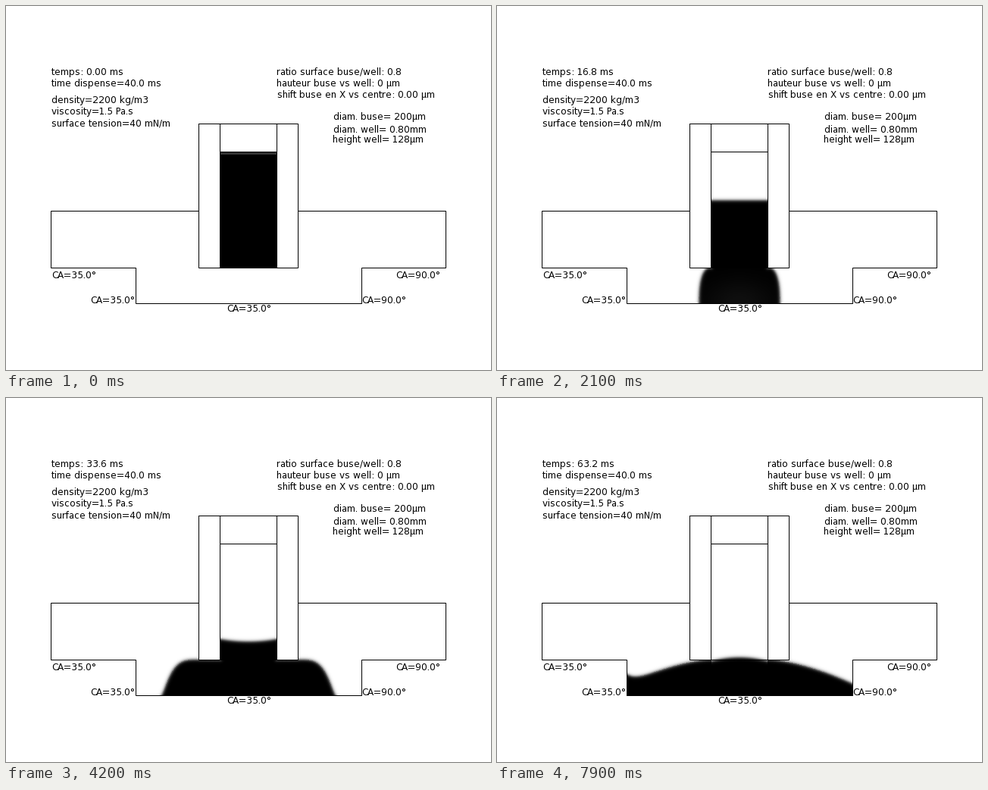
A matplotlib script that plays this animation: 640x480 px, repeating every 8000 ms.

```python
import numpy as np
import matplotlib.pyplot as plt
from matplotlib.animation import FuncAnimation
from matplotlib.path import Path

W, H, DPI = 640, 480, 100
FRAMES, INTERVAL = 80, 100
MS_PER_FRAME = 0.8
STOP = 50                      # step at which dispensing ends
MID, BORE = 320, 37.5          # nozzle axis and inner radius
LIP, FLOOR, FILL = 345, 392, 192.5
DEPTH = FLOOR - LIP
SPEED = 3.03                   # fall of the level per step
BLUR = 2.4                     # interface thickness

plt.rcParams.update({"font.family": "DejaVu Sans", "text.hinting_factor": 1})

# Pixel centres of the well and of the nozzle bore
X0, X1, Y0 = 171, 470, 330
wx, wy = np.meshgrid(np.arange(X0, X1) + 0.5, np.arange(Y0, FLOOR + 1) + 0.5)
well_pts = np.c_[wx.ravel(), wy.ravel()]
in_bore = np.abs(wx - MID) < BORE
in_wall = (wy < LIP) & ~in_bore & (np.abs(wx - MID) < 65.5)
nx, ny = np.meshgrid(np.arange(283, 358) + 0.5, np.arange(193, LIP) + 0.5)
s = np.linspace(0, 1, 120)


def hanging(i):
    """Half outline of the drop below the nozzle: distance from axis, y."""
    a = s * np.pi / 2
    power = 1 - 0.016 * min(i, 15)
    x = BORE * np.cos(a)**power + 6 * (i / 14)**3 * np.sin(2 * a)
    return np.c_[x, LIP + 46 * np.tanh(i / 9) * np.sin(a)**power]


def spreading(i, wick):
    """Half outline on the floor; the area grows with the dispensed volume."""
    reach = max(1, 2.93 * (min(i, STOP) - 15.5))
    if i > STOP:
        reach = min(98 + 0.9 * (i - STOP), 112.5)
    stages = [29, 42, STOP, 66, 79]
    p = np.interp(i, stages, [2.5, 7, 7, 3, 1.6])
    q = np.interp(i, stages, [0.4, 1.5, 1.5, 1, 1])
    late = np.clip((i - 66) / 13, 0, 1)
    u = 1 - (1 - s)**2
    g = (1 - (1 - 0.32 * late) * u**p)**q + wick * late * u**10
    x = BORE + reach * u
    swell = 3 * max(0, 1 - abs(i - STOP) / 10)
    return np.c_[x, FLOOR - DEPTH * g - swell * np.exp(-((x - 83) / 15)**2)]


def outline(i, wick):
    f = np.clip((i - 14) / 4, 0, 1)
    if f == 0:
        return hanging(i)
    return (1 - f) * hanging(min(i, 18)) + f * spreading(i, wick)


def surface(x, i):
    """Free surface inside the nozzle."""
    bow = np.interp(i, [32, STOP, 62, 79], [0, 6, 1.5, -5])
    return FILL + SPEED * min(i, STOP) + bow * (0.4 - ((x - MID) / BORE)**2)


def smooth(d):
    return 0.5 * (1 + np.tanh(d / BLUR))


def well_field(i):
    r = outline(i, 0) + [MID, 0]
    l = outline(i, 0.3) * [-1, 1] + [MID, 0]
    below = FLOOR + 40
    shape = np.vstack([[MID + BORE, 300], r, [r[-1, 0], below],
                       [l[-1, 0], below], l[::-1], [MID - BORE, 300]])
    inside = Path(shape).contains_points(well_pts).reshape(wx.shape)
    d2 = np.full(wx.shape, 1e6)
    for x, y in np.vstack([r, l]):
        np.minimum(d2, (wx - x)**2 + (wy - y)**2, out=d2)
    d = np.where(inside, 1, -1) * np.sqrt(d2)
    top = wy - surface(wx, i)
    d = np.where(in_bore, np.where(wy < LIP, top, np.minimum(d, top)), d)
    # thin residue of gas trapped at the floor
    haze = 0.11 * max(0, 1 - abs(i - 27) / 13)
    gas = haze * np.exp(-((wx - MID) / 48)**2 - ((wy - FLOOR) / 32)**2)
    return np.where(in_wall, 0, smooth(d) * (1 - gas))


def picture(i):
    img = np.ones((H, W))
    if i == 0:
        img[193:LIP, 283:358] = 0
        img[193:196, 283:358] = 0.2
        return img
    img[Y0:FLOOR + 1, X0:X1] = 1 - well_field(i)
    img[193:LIP, 283:358] = 1 - smooth(ny - surface(nx, i))
    return img


def clock(i):
    t = i * MS_PER_FRAME
    return f"temps: {t:.2f} ms" if t < 9.95 else f"temps: {t:.1f} ms"


fig = plt.figure(figsize=(W / DPI, H / DPI), dpi=DPI, facecolor="white")
ax = fig.add_axes([0, 0, 1, 1])
ax.set_xlim(0, W)
ax.set_ylim(H, 0)
ax.axis("off")

image = ax.imshow(picture(0), cmap="gray", vmin=0, vmax=1, aspect="auto",
                  extent=(0, W, H, 0), interpolation="nearest")


def line(*pts):
    """One pixel wide line through pixel centres."""
    x, y = np.array(pts).T + 0.5
    ax.plot(x, y, color="black", lw=72 / DPI, snap=False,
            solid_joinstyle="miter", solid_capstyle="projecting")


line((254, 270), (59, 270), (59, 345), (171, 345), (171, 392), (469, 392),
     (469, 345), (580, 345), (580, 270), (385, 270))
line((254, 155), (385, 155), (385, 345), (254, 345), (254, 155))
line((282, 155), (282, 345))
line((357, 155), (357, 345))
line((282, 192), (357, 192))


def label(x, y, text):
    return ax.text(x, y, text, fontsize=12 * 72 / DPI, color="black",
                   va="baseline", ha="left")


timer = label(60, 91, clock(0))
for x, y, text in [
    (60, 106, "time dispense=40.0 ms"),
    (60, 128, "density=2200 kg/m3"),
    (60, 143, "viscosity=1.5 Pa.s"),
    (60, 159, "surface tension=40 mN/m"),
    (357, 91, "ratio surface buse/well: 0.8"),
    (357, 106, "hauteur buse vs well: 0 µm"),
    (358, 121, "shift buse en X vs centre: 0.00 µm"),
    (432, 150, "diam. buse= 200µm"),
    (432, 167, "diam. well= 0.80mm"),
    (431, 180, "height well= 128µm"),
    (60, 359, "CA=35.0°"),
    (111, 392, "CA=35.0°"),
    (291, 403, "CA=35.0°"),
    (469, 392, "CA=90.0°"),
    (514, 359, "CA=90.0°"),
]:
    label(x, y, text)


def update(i):
    image.set_data(picture(i))
    timer.set_text(clock(i))
    return image, timer


anim = FuncAnimation(fig, update, frames=FRAMES, interval=INTERVAL,
                     repeat=True, repeat_delay=0, blit=False)
plt.show()
```
